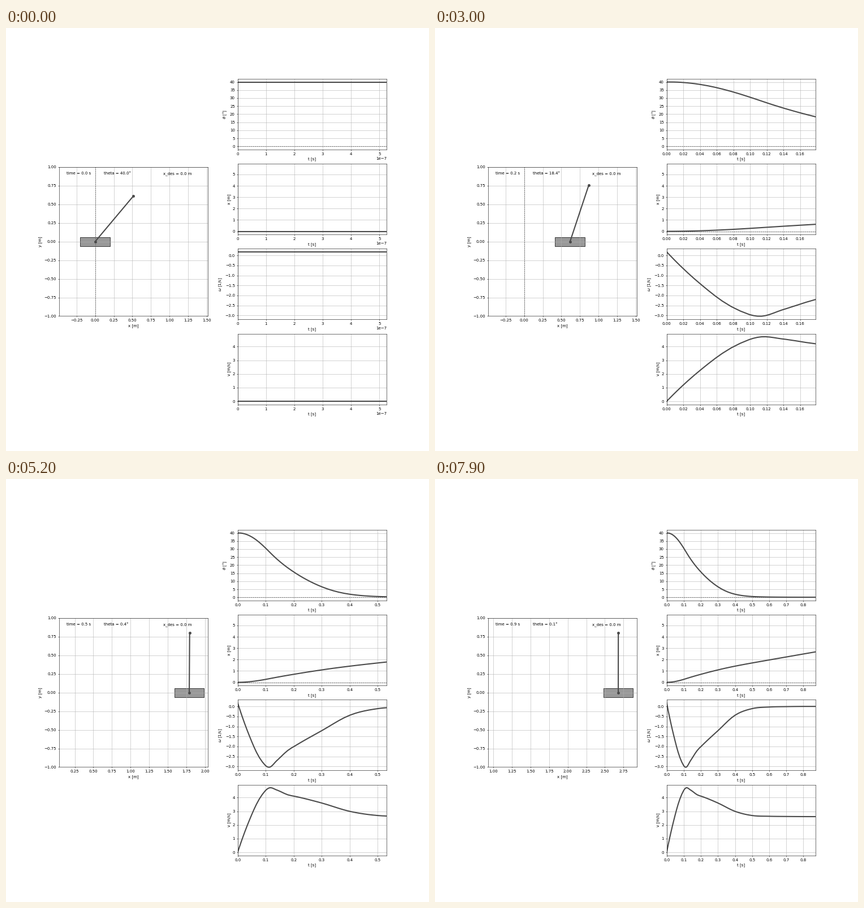
Write a matplotlib script that moves like this. It is 748 by 748 pixels and loops after 8 s.

```python
import numpy as np
import matplotlib.pyplot as plt
from matplotlib.animation import FuncAnimation
from matplotlib.patches import Rectangle

DPI, SIZE, FRAMES = 50, 748, 80
DARK = "0.29"
POLE, CART_W, CART_H = 0.8, 0.4, 0.12
VIEW_LEFT, VIEW_LAG = -0.4865, 1.75
START_TILT, END_TILT = 40, 0.06
FIRST_STEP, GROWTH, RAMP = 5.26e-7, 4, 7

# Key points of the motion: time, angular velocity, cart velocity
KEYS = np.array([
    (0.00, 0.175, 0.0), (0.04, -1.41, 2.26), (0.08, -2.61, 3.995),
    (0.112, -3.038, 4.71), (0.14, -2.70, 4.555), (0.18, -2.185, 4.20),
    (0.21, -1.925, 4.07), (0.30, -1.21, 3.605), (0.40, -0.44, 2.995),
    (0.50, -0.11, 2.69), (0.60, -0.03, 2.635), (0.70, -0.01, 2.62),
    (0.90, -0.003, 2.61),
]).T

# Where the solver changes pace: step number, time reached
PACE = np.array([
    (RAMP, FIRST_STEP * GROWTH ** RAMP), (9, 0.0167), (15, 0.0666), (18, 0.0991),
    (27, 0.143), (30, 0.1787), (39, 0.29995), (45, 0.42), (52, 0.5317),
    (68, 0.7806), (79, 0.8718),
]).T


def smooth(t, knots, values):
    """Cubic Hermite curve through a few points."""
    slopes = np.gradient(values, knots, edge_order=2)
    i = np.clip(np.searchsorted(knots, t, side="right") - 1, 0, len(knots) - 2)
    h = knots[i + 1] - knots[i]
    s = (t - knots[i]) / h
    return ((1 + 2 * s) * (1 - s) ** 2 * values[i] + s * (1 - s) ** 2 * h * slopes[i]
            + s * s * (3 - 2 * s) * values[i + 1] + s * s * (s - 1) * h * slopes[i + 1])


def integral(t, rate):
    areas = np.diff(t) * (rate[1:] + rate[:-1]) / 2
    return np.concatenate([[0], np.cumsum(areas)])


# Solver steps grow fourfold at first, then keep an even pace
step = np.arange(FRAMES)
ramp_up = FIRST_STEP * GROWTH ** np.minimum(step, RAMP).astype(float)
times = np.concatenate([[0], np.where(step < RAMP, ramp_up, np.interp(step, *PACE))])

fine = np.linspace(0, 0.9, 9001)
omega_fine, v_fine = (smooth(fine, KEYS[0], k) for k in KEYS[1:])
swing = integral(fine, omega_fine)
theta_fine = START_TILT + (END_TILT - START_TILT) * swing / swing[-1]
x_fine = integral(fine, v_fine)
theta, x, omega, v = (np.interp(times, fine, c)
                      for c in (theta_fine, x_fine, omega_fine, v_fine))

fig = plt.figure(figsize=(SIZE / DPI, SIZE / DPI), dpi=DPI)

scene = fig.add_subplot(1, 2, 1)
scene.set_aspect("equal")
scene.set(xlim=(VIEW_LEFT, VIEW_LEFT + 2), ylim=(-1, 1), xlabel="x [m]", ylabel="y [m]")
scene.grid(True)
zero_style = dict(color="0.3", lw=1, ls="--")
scene.axvline(0, **zero_style)
cart = scene.add_patch(Rectangle((-CART_W / 2, -CART_H / 2), CART_W, CART_H,
                                 facecolor="0.6", edgecolor="k", lw=1))
pole, = scene.plot([], [], "o-", color=DARK, lw=3)
clock, angle, goal = (scene.text(pos, 0.95, "", transform=scene.transAxes)
                      for pos in (0.05, 0.3, 0.7))
goal.set_text("x_des = 0.0 m")

panels = [
    (theta, r"$\theta$ [°]", (-2, 42.03), True),
    (x, "x [m]", (-0.283, 5.943), True),
    (omega, r"$\omega$ [1/s]", (-3.199, 0.335), False),
    (v, "v [m/s]", (-0.2357, 4.95), False),
]
plots = []
for row, (data, label, ylim, has_zero) in enumerate(panels):
    ax = fig.add_subplot(4, 2, 2 * row + 2)
    ax.set(ylim=ylim, xlabel="t [s]", ylabel=label)
    ax.grid(True)
    if has_zero:
        ax.axhline(0, **zero_style)
    line, = ax.plot([], [], color=DARK, lw=3)
    plots.append((ax, line, data))


def update(frame):
    n = frame + 1
    pos, tilt = x[n], np.radians(theta[n])
    cart.set_x(pos - CART_W / 2)
    pole.set_data([pos, pos + POLE * np.sin(tilt)], [0, POLE * np.cos(tilt)])
    left = max(VIEW_LEFT, pos - VIEW_LAG)
    scene.set_xlim(left, left + 2)
    clock.set_text(f"time = {times[n]:.1f} s")
    angle.set_text(f"theta = {theta[n]:.1f}°")
    for ax, line, data in plots:
        line.set_data(times[:n + 1], data[:n + 1])
        ax.set_xlim(0, times[n])


anim = FuncAnimation(fig, update, frames=FRAMES, interval=100,
                     init_func=lambda: update(0), repeat=True, repeat_delay=0)
plt.show()
```
